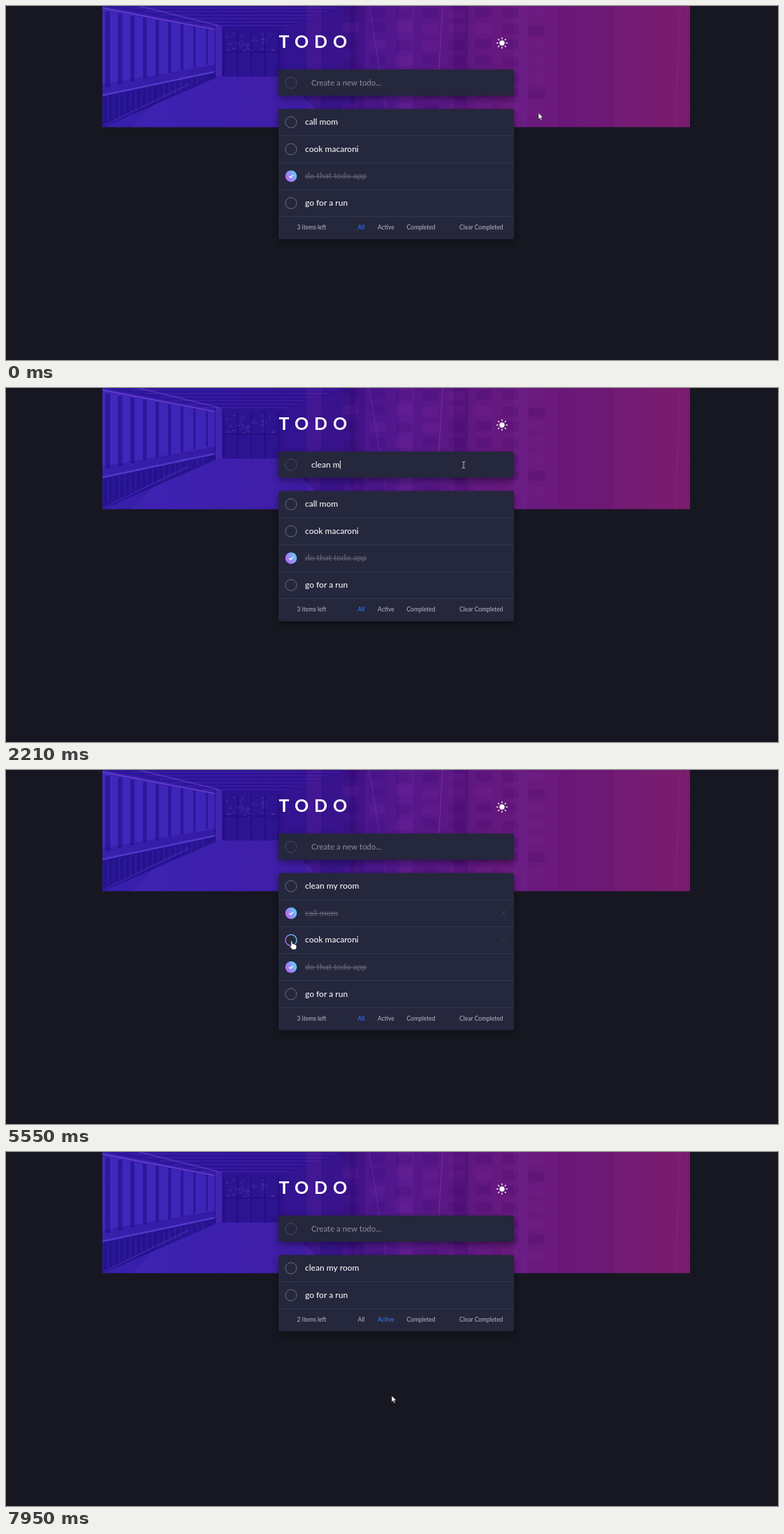
Recreate the animation shown at these times as an HTML page with a canvas. Size 1105 by 507 pixels, loop 8 s.

```html
<!DOCTYPE html>
<html lang="en">
<head>
<meta charset="utf-8">
<title>Todo</title>
<style>
html, body { margin: 0; width: 100%; height: 100%; overflow: hidden; background: #171722; }
canvas { display: block; }
</style>
</head>
<body>
<canvas id="stage" width="1105" height="507"></canvas>
<script>
const canvas = document.getElementById("stage");
const screen = canvas.getContext("2d");
let ctx = screen;

const LOOP = 8000, STEP = 1000 / 15;
const LEFT = 390, RIGHT = 727, LIST_TOP = 147.5, ROW = 38.6, FOOTER = 32;
const SANS = "Lato, sans-serif";
const LINK = "#b9bacb", ACCENT = "#3a7cfd", PANEL = "#25273c";

const added = 3480, firstDone = 5090, secondDone = 5750, filtered = 7670;
const clicks = [[740, 940], [4960, 5160], [5680, 5820], [7600, 7740]];
const typing = [
  [1400, "c"], [1540, "cl"], [1810, "cle"], [1880, "clea"], [2010, "clean"],
  [2080, "clean "], [2210, "clean m"], [2340, "clean my"], [2610, "clean my "],
  [2680, "clean my r"], [2750, "clean my ro"], [2820, "clean my roo"],
  [3020, "clean my room"], [added, ""]
];
const path = [
  [0, 762, 153], [130, 762, 153], [270, 724, 136], [400, 676, 115], [535, 655, 110],
  [4210, 655, 110], [4400, 580, 148], [4600, 470, 194], [4790, 404, 218], [4930, 405, 210],
  [5200, 405, 210], [5400, 407, 222], [5535, 409, 245], [5650, 409, 246],
  [5950, 409, 246], [6070, 417, 240], [6330, 490, 282], [6770, 598, 347],
  [6930, 592, 350], [7200, 558, 356], [7460, 548, 354], [7880, 548, 354], [7930, 552, 349]
];

function pointer(time) {
  const q = Math.floor((time + 11) / STEP) * STEP;
  const i = path.findIndex(p => p[0] > q);
  if (i < 1) return path[i < 0 ? path.length - 1 : 0].slice(1);
  const [t0, x0, y0] = path[i - 1], [t1, x1, y1] = path[i];
  const u = (q - t0) / (t1 - t0);
  return [x0 + (x1 - x0) * u, y0 + (y1 - y0) * u];
}

function text(str, x, y, size, color, weight = 400, family = SANS) {
  ctx.font = `${weight} ${size}px ${family}`;
  ctx.fillStyle = color;
  ctx.fillText(str, x, y);
  return ctx.measureText(str).width;
}

function rect(x, y, w, h, color) {
  ctx.fillStyle = color;
  ctx.fillRect(x, y, w, h);
}

function shape(points, fill, stroke, width = 1, close = true) {
  ctx.beginPath();
  for (let i = 0; i < points.length; i += 2) ctx.lineTo(points[i], points[i + 1]);
  if (close) ctx.closePath();
  if (fill) { ctx.fillStyle = fill; ctx.fill(); }
  if (stroke) { ctx.strokeStyle = stroke; ctx.lineWidth = width; ctx.stroke(); }
}

const line = (points, color, width) => shape(points, null, color, width, false);

function disc(x, y, r, fill, stroke, width = 0.9) {
  ctx.beginPath();
  ctx.arc(x, y, r, 0, Math.PI * 2);
  if (fill) { ctx.fillStyle = fill; ctx.fill(); }
  if (stroke) { ctx.strokeStyle = stroke; ctx.lineWidth = width; ctx.stroke(); }
}

function linear(x0, y0, x1, y1, colors) {
  const g = ctx.createLinearGradient(x0, y0, x1, y1);
  colors.forEach((c, i) => g.addColorStop(i / (colors.length - 1), c));
  return g;
}

function random(seed) {
  const v = Math.sin(seed * 127.1) * 43758.5453;
  return v - Math.floor(v);
}

function paintBanner() {
  ctx.save();
  ctx.beginPath();
  ctx.rect(138, 0, 841, 173.5);
  ctx.clip();
  rect(138, 0, 841, 174, linear(138, 0, 979, 0,
    ["#3820ad", "#351ba6", "#3b179b", "#52178c", "#65187f", "#701b79", "#7b1c6d"]));

  // corridor: ceiling, openings between posts, floor
  shape([138, 0, 500, 0, 395, 30, 300, 30], "rgba(25,8,125,.35)");
  for (let i = 0; i < 6; i++) {
    const y = 3 + i * 5;
    line([180 + i * 20, y, 475 - i * 14, y], "rgba(125,70,220,.22)", 1.5);
  }
  shape([138, 5, 300, 36, 300, 84, 138, 112], "rgba(75,50,205,.45)");
  for (let i = 0; i < 9; i++) {
    const x = 142 + i * 18;
    rect(x, 8 + i * 3, 7 - i * 0.5, 108 - i * 7, "rgba(24,10,130,.5)");
  }
  line([138, 3, 300, 34], "rgba(140,90,235,.5)", 2);
  line([190, 0, 304, 28], "rgba(125,75,225,.4)", 2);
  shape([250, 100, 395, 100, 470, 174, 180, 174], "rgba(75,42,190,.35)");
  shape([138, 129, 300, 94, 300, 103, 138, 174], "rgba(25,10,120,.55)");
  for (let i = 0; i < 19; i++) {
    const x = 138 + i * 8;
    line([x, 131 - i * 1.7, x, 168 - i * 3.3], "rgba(85,65,215,.38)", 1);
  }
  line([138, 128, 300, 94], "rgba(95,75,225,.65)", 2.5);
  line([138, 172, 262, 112], "rgba(80,55,205,.5)", 1.5);

  // doorway
  rect(298, 30, 98, 71, "rgba(32,12,130,.5)");
  rect(300, 28, 9, 73, "rgba(90,55,205,.5)");
  for (let i = 0; i < 36; i++) {
    rect(314 + random(i) * 70, 38 + random(i + 50) * 28, 2 + random(i + 90) * 5, 2,
      "rgba(145,90,190,.3)");
  }
  rect(312, 35, 78, 66, "rgba(45,20,145,.3)");
  for (let x = 312; x < 392; x += 19.5) line([x, 35, x, 101], "rgba(30,10,115,.8)", 1.5);
  line([312, 66, 390, 66], "rgba(35,12,125,.8)", 2);

  // stone wall with pillars
  shape([395, 30, 500, 0, 500, 174, 470, 174, 395, 101], "rgba(30,8,115,.28)");
  for (let i = 0; i < 5; i++) {
    const x = 430 + i * 58 + i * i * 4;
    shape([x, 0, x + 22, 0, x + 20, 174, x + 2, 174],
      i % 2 ? "rgba(50,5,95,.25)" : "rgba(125,45,165,.18)");
  }
  for (let i = 0; i < 60; i++) {
    const col = i % 8, row = Math.floor(i / 8);
    rect(482 + col * 38, row * 23 + random(i) * 5, 23, 14,
      random(i + 7) > 0.5 ? "rgba(135,45,155,.14)" : "rgba(50,5,95,.15)");
  }
  line([520, 0, 548, 174], "rgba(145,65,185,.22)", 2);
  line([625, 0, 619, 100], "rgba(165,65,165,.35)", 1.5);
  rect(790, 0, 80, 174, "rgba(85,10,100,.14)");
  line([965, 0, 958, 174], "rgba(155,50,135,.3)", 1.5);
  ctx.restore();
}

const banner = document.createElement("canvas");
banner.width = 1105;
banner.height = 174;
ctx = banner.getContext("2d");
paintBanner();
ctx = screen;

function panel(y, h) {
  ctx.save();
  ctx.shadowColor = "rgba(0,0,0,.4)";
  ctx.shadowBlur = 12;
  ctx.shadowOffsetY = 4;
  ctx.fillStyle = PANEL;
  ctx.beginPath();
  ctx.roundRect(LEFT, y, RIGHT - LEFT, h, 2.5);
  ctx.fill();
  ctx.restore();
}

function sun() {
  disc(710, 53, 3.7, "#fff");
  for (let i = 0; i < 8; i++) {
    const a = i * Math.PI / 4, c = Math.cos(a), s = Math.sin(a);
    line([710 + c * 5.6, 53 + s * 5.6, 710 + c * 8, 53 + s * 8], "#fff", 1.4);
  }
}

function caretVisible(t) {
  return (t >= 740 && t < 1140) || (t >= 1400 && t < 4010) || (t >= 4210 && t < firstDone);
}

function drawInput(t) {
  panel(91, 37.5);
  ctx.setLineDash([1, 1.1]);
  disc(408, 110, 8, null, "#77788d", 0.9);
  ctx.setLineDash([]);
  const typed = typing.filter(k => k[0] <= t).pop()?.[1] || "";
  const width = typed ? text(typed, 437, 113.5, 12, "#f4f4f8", 500) : 0;
  if (!typed) text("Create a new todo...", 437, 113.5, 11.4, "#8d8e9e");
  if (caretVisible(t)) rect(437 + Math.round(width), 104, 1, 12, "#eee");
}

function todos(t) {
  const list = [
    ["call mom", t >= firstDone], ["cook macaroni", t >= secondDone],
    ["do that todo app", true], ["go for a run", false]
  ];
  if (t >= added) list.unshift(["clean my room", false]);
  return list;
}

// Fraction of the last 250 ms spent over a row.
function rowHover(t, y) {
  let hits = 0;
  for (let i = 0; i < 5; i++) {
    const [px, py] = pointer(t - i * 50);
    if (px > LEFT && px < RIGHT && Math.abs(py - y) < ROW / 2) hits++;
  }
  return hits / 5;
}

function overBox(px, py, y) {
  return Math.hypot(px - 408, py - y) < 9;
}

function drawRow([label, done], y, t, px, py) {
  const rainbow = linear(400, y + 4, 416, y - 4, ["#b865f4", "#8f92f6", "#5cd3fc"]);
  if (done) {
    disc(408, y, 8.3, rainbow);
    line([405.4, y + 0.1, 407.3, y + 2, 410.9, y - 1.7], "#fff", 1.4);
  } else {
    const hot = overBox(px, py, y);
    disc(408, y, 8, null, hot ? rainbow : "#747589", hot ? 1.4 : 0.9);
  }
  const width = text(label, 428, y + 3.7, 12, done ? "#606175" : "#f7f7fa", 500);
  if (done) rect(428, y, width, 1, "#6b6c7f");
  const hover = rowHover(t, y);
  if (hover) {
    ctx.globalAlpha = hover;
    line([707.5, y - 4.5, 716.5, y + 4.5], "#4b4e68", 1);
    line([716.5, y - 4.5, 707.5, y + 4.5], "#4b4e68", 1);
    ctx.globalAlpha = 1;
  }
  rect(LEFT, y + ROW / 2 - 0.5, RIGHT - LEFT, 1, "#37394d");
}

function drawList(t, px, py) {
  const all = todos(t), left = all.filter(item => !item[1]);
  const shown = t >= filtered ? left : all;
  const bottom = LIST_TOP + shown.length * ROW;
  panel(LIST_TOP, shown.length * ROW + FOOTER);
  shown.forEach((item, i) => drawRow(item, LIST_TOP + (i + 0.5) * ROW - 0.3, t, px, py));
  const base = bottom + 18.3;
  text(`${left.length} items left`, 416.5, base, 8.5, LINK);
  const active = t >= filtered ? "Active" : "All";
  for (const [label, x, end] of [["All", 503.5, 514], ["Active", 532, 555],
    ["Completed", 573.5, 614], ["Clear Completed", 649, 712]]) {
    const hot = px >= x && px <= end && Math.abs(py - base + 3) < 8;
    text(label, x, base, 8.5, label === active ? ACCENT : hot ? "#fff" : LINK);
  }
}

function drawSuggestions() {
  rect(431.5, 123.5, 289.5, 71.5, "#85858a");
  rect(432, 124, 288.5, 70.5, "#fff");
  ["c", "cartofi", "castraveti", "call mom", "cook macaroni", "ciocolata"].forEach((s, i) =>
    text(s, 435, 133 + i * 11.7, 6.8, "#111", 400, "'Open Sans', sans-serif"));
  rect(711, 124, 9.5, 70.5, "#f0f0f0");
  rect(711, 134, 9.5, 14.5, "#cdcdcd");
  line([713.4, 130.4, 715.6, 128.2, 717.8, 130.4], "#444", 1.2);
  line([713.4, 188.2, 715.6, 190.4, 717.8, 188.2], "#444", 1.2);
}

function drawPointer(t, x, y) {
  if (clicks.some(([from, to]) => t >= from && t < to)) disc(x, y, 7, "rgba(190,180,20,.8)");
  const inInput = x < RIGHT && x > LEFT && y > 91 && y < 128;
  const onBox = y > 140 && y < 270 && [205, 243.7].some(c => overBox(x, y, c));
  ctx.save();
  ctx.translate(x, y);
  ctx.lineJoin = "round";
  if (inInput) {
    line([-2.5, -4.5, 0, -4, 2.5, -4.5], "#b9b9c2", 0.9);
    line([0, -4, 0, 4.5], "#b9b9c2", 1);
    line([-2.5, 5, 0, 4.5, 2.5, 5], "#b9b9c2", 0.9);
  } else if (onBox) {
    shape([-1.2, 0, 0.8, 0, 1.2, 4, 3, 4, 3.5, 5, 5, 4.7, 5.5, 5.8, 7, 6, 7, 9.5,
      5.7, 12.5, 0.5, 12.5, -2.8, 8, -2.4, 6.8, -1, 7.5], "#fff", "#111", 0.8);
  } else {
    shape([0, 0, 0, 9.2, 2.1, 7.3, 3.6, 10.8, 5.2, 10.1, 3.8, 6.8, 6.7, 6.6],
      "#fff", "#111", 0.6);
  }
  ctx.restore();
}

function draw(t) {
  const [px, py] = pointer(t);
  rect(0, 0, 1105, 507, "#171722");
  ctx.drawImage(banner, 0, 0);
  ctx.letterSpacing = "8px";
  text("TODO", 390.5, 59.5, 25, "#fff", 700);
  ctx.letterSpacing = "0px";
  sun();
  drawInput(t);
  drawList(t, px, py);
  if (t >= 1470 && t < 1610) drawSuggestions();
  drawPointer(t, px, py);
}

function tick() {
  draw(performance.now() % LOOP);
  requestAnimationFrame(tick);
}
tick();
</script>
</body>
</html>
```
